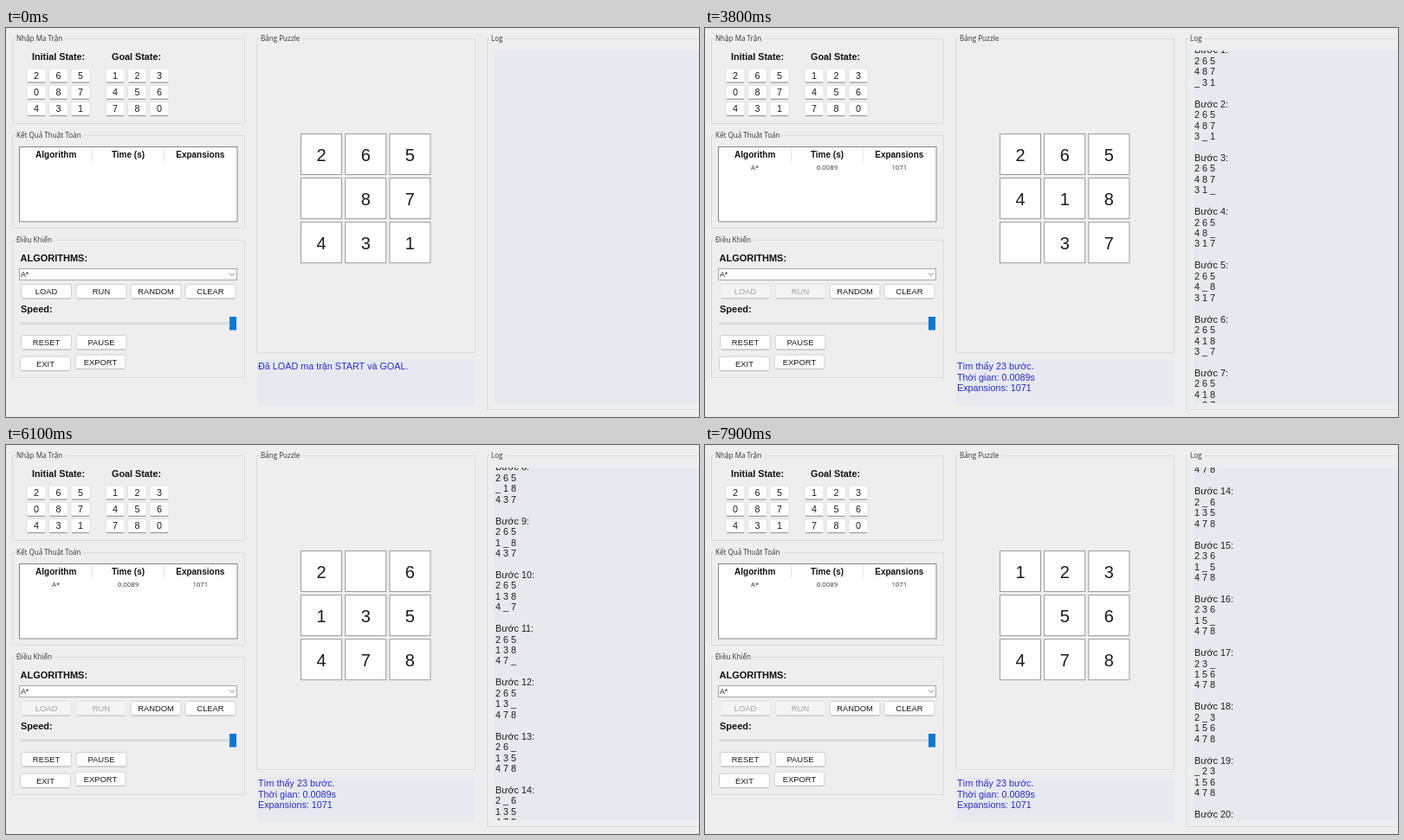
These frames come from a looping animation (800 by 450 pixels, 8 s). An HTML page:

```html
<!DOCTYPE html>
<html lang="vi">
<head>
<meta charset="utf-8">
<title>8-puzzle</title>
<style>
html, body { margin: 0; width: 100%; height: 100%; overflow: hidden; background: #eee; }
svg { display: block; }
text { font-family: "Liberation Sans", Arial, sans-serif; white-space: pre; fill: #1c1c1c; }
.ui { font-family: "Open Sans", "Noto Sans", sans-serif; fill: #333; }
.bold { font-weight: bold; fill: #111; }
.status { fill: #2a2ad4; }
.mid { text-anchor: middle; }
</style>
</head>
<body>
<svg id="stage" width="800" height="450" viewBox="0 0 800 450">
  <clipPath id="logClip"><rect x="564" y="26" width="236" height="408"/></clipPath>
</svg>
<script>
const LOOP = 8000, CLICK = 1100, FIRST = 1175, STEP = 335, LINE = 12.45;
const stage = document.getElementById("stage");

function add(tag, attrs, parent = stage) {
  const el = document.createElementNS("http://www.w3.org/2000/svg", tag);
  for (const k in attrs) el.setAttribute(k, attrs[k]);
  return parent.appendChild(el);
}
function box(x, y, width, height, fill, stroke = "none", rx = 0) {
  return add("rect", { x, y, width, height, fill, stroke, rx });
}
// y is the middle of the capitals
function label(str, x, y, size, cls = "", parent = stage) {
  const el = add("text", { x, y: y + size * 0.36, "font-size": size, class: cls }, parent);
  el.textContent = str;
  return el;
}
function panel(title, x, y, w, h, titleWidth) {
  box(x + .5, y + .5, w, h, "none", "#dcdcdc");
  box(x + 4, y - 3, titleWidth + 3, 8, "#eee");
  label(title, x + 5, y - .3, 8.1, "ui");
}
function button(str, x, y) {
  const rect = box(x + .5, y + .5, 58, 16.5, "#fdfdfd", "#d0d0d0", 2.5);
  add("path", { d: `M${x + 2} ${y + 17}h55`, stroke: "#bcbcbc" });
  return { rect, text: label(str, x + 29.5, y + 8.9, 9.4, "mid") };
}
const show = (el, on) => el.setAttribute("visibility", on ? "visible" : "hidden");

// Puzzle states, following the blank cell
const states = ["265087431"];
for (const move of "DRRULDLURDRUULDRULLD") {
  const cells = [...states.at(-1)], from = cells.indexOf("0");
  const to = from + { U: -3, D: 3, L: -1, R: 1 }[move];
  [cells[from], cells[to]] = [cells[to], "0"];
  states.push(cells.join(""));
}

// Input matrices
panel("Nhập Ma Trận", 7, 12, 268, 98, 54);
label("Initial State:", 30, 33.5, 10.8, "bold");
label("Goal State:", 122, 33.5, 10.8, "bold");
[[states[0], 35], ["123456780", 126]].forEach(([state, left]) => {
  [...state].forEach((digit, i) => {
    const x = left + i % 3 * 25.5, y = 55 + (i / 3 | 0) * 19.3;
    box(x - 11, y - 8, 22, 16, "#fff", "#e2e2e2", 2);
    add("path", { d: `M${x - 10} ${y + 8}h20`, stroke: "#8f8f8f" });
    label(digit, x, y, 10.8, "mid");
  });
});

// Results table
panel("Kết Quả Thuật Toán", 7, 124, 268, 107, 75);
box(15.5, 137.5, 251.5, 86.5, "#fff", "#858585");
add("path", { d: "M99.5 138v16M182.5 138v16", stroke: "#e5e5e5" });
const results = add("g", {});
[["Algorithm", "A*", 57.7], ["Time (s)", "0.0089", 141], ["Expansions", "1071", 224.3]]
  .forEach(([head, value, x]) => {
    label(head, x, 146, 10, "bold mid");
    label(value, x, 161, 7.8, "ui mid", results);
  });

// Controls
panel("Điều Khiển", 7, 245, 268, 159, 41);
label("ALGORITHMS:", 16.5, 266, 11, "bold");
box(15.5, 278.5, 251, 13, "#fff", "#a8a8a8");
label("A*", 17, 285.2, 8.8);
add("path", { d: "M258 283.5l3 3l3-3", fill: "none", stroke: "#777" });
const loadButton = button("LOAD", 17, 296), runButton = button("RUN", 80.5, 296);
button("RANDOM", 143.5, 296);
button("CLEAR", 206.5, 296);
label("Speed:", 17, 325, 11, "bold");
box(16, 340.5, 243, 2.5, "#dadada");
box(258, 334, 8, 15.5, "#0b78d7");
button("RESET", 17, 355);
button("PAUSE", 80.5, 355);
button("EXIT", 16, 379.5);
button("EXPORT", 79.5, 377.5);

// Board
panel("Bảng Puzzle", 289, 12, 252, 363, 45);
const tiles = Array.from({ length: 9 }, (_, i) => {
  const x = 340.5 + i % 3 * 51.2, y = 122.5 + (i / 3 | 0) * 51.1;
  box(x, y, 47, 47, "#fff", "#9b9b9b");
  return label("", x + 23.5, y + 24, 20, "mid");
});

// Status
box(290, 384, 251, 52, "#e6eaf0");
const summary = ["Tìm thấy 23 bước.", "Thời gian: 0.0089s", "Expansions: 1071"];
const loaded = label("Đã LOAD ma trận START và GOAL.", 291, 391.5, 10.8, "status");
const found = add("g", {});
summary.forEach((s, i) => label(s, 291, 391.5 + i * LINE, 10.8, "status", found));

// Log
panel("Log", 555, 12, 260, 429, 14);
box(564, 26, 236, 408, "#e6eaf0");
const view = add("g", { "clip-path": "url(#logClip)" });
const log = add("g", {}, view);
summary.forEach((s, i) => label(s, 565, 33.5 + i * LINE, 10.8, "", log));
const entries = states.map((state, k) => {
  const entry = add("g", {}, log);
  const rows = state.replace("0", "_").match(/.../g).map(r => [...r].join(" "));
  [`Bước ${k}:`, ...rows].forEach((s, i) =>
    label(s, 565, 71 + (5 * k + i) * LINE, 10.8, "", entry));
  return entry;
});

const cursor = add("path", {
  d: "M0 0v11.5l2.7-2.5l1.8 4l2-.9l-1.8-3.9h3.6z",
  fill: "#fff", stroke: "#444", "stroke-width": .8
});

function setButton({ rect, text }, disabled, focused = false) {
  rect.setAttribute("fill", disabled ? "#f4f4f4" : "#fdfdfd");
  rect.setAttribute("stroke", focused ? "#8c8c8c" : disabled ? "#e6e6e6" : "#d0d0d0");
  rect.setAttribute("stroke-dasharray", focused ? "1 1" : "none");
  text.style.fill = disabled ? "#a0a0a0" : "";
}

function draw(t) {
  const done = t >= CLICK;
  const step = Math.max(0, Math.min(20, Math.floor((t - FIRST) / STEP)));
  [...states[step]].forEach((d, i) => tiles[i].textContent = d === "0" ? "" : d);
  setButton(loadButton, done);
  setButton(runButton, done, done && t < 1800);
  show(results, done);
  show(found, done);
  show(loaded, !done);
  show(log, done);
  entries.forEach((entry, k) => entry.setAttribute("display", k <= step && t >= FIRST ? "inline" : "none"));

  // Keep the newest entry near the bottom edge
  const bottom = step < 16 ? 399 : 427;
  const scroll = step < 6 ? 0 : 71 + step * 5 * LINE - bottom;
  log.setAttribute("transform", `translate(0 ${-scroll})`);

  const p = Math.max(0, Math.min(1, (t - 300) / 600));
  const rest = (1 - p) ** 3;
  cursor.setAttribute("transform", `translate(${106.5 + 700 * rest} ${306 - 50 * rest})`);
  show(cursor, t >= 300 && t < 1900);
}

function frame(now) {
  draw(now % LOOP);
  requestAnimationFrame(frame);
}
draw(0);
requestAnimationFrame(frame);
</script>
</body>
</html>
```
